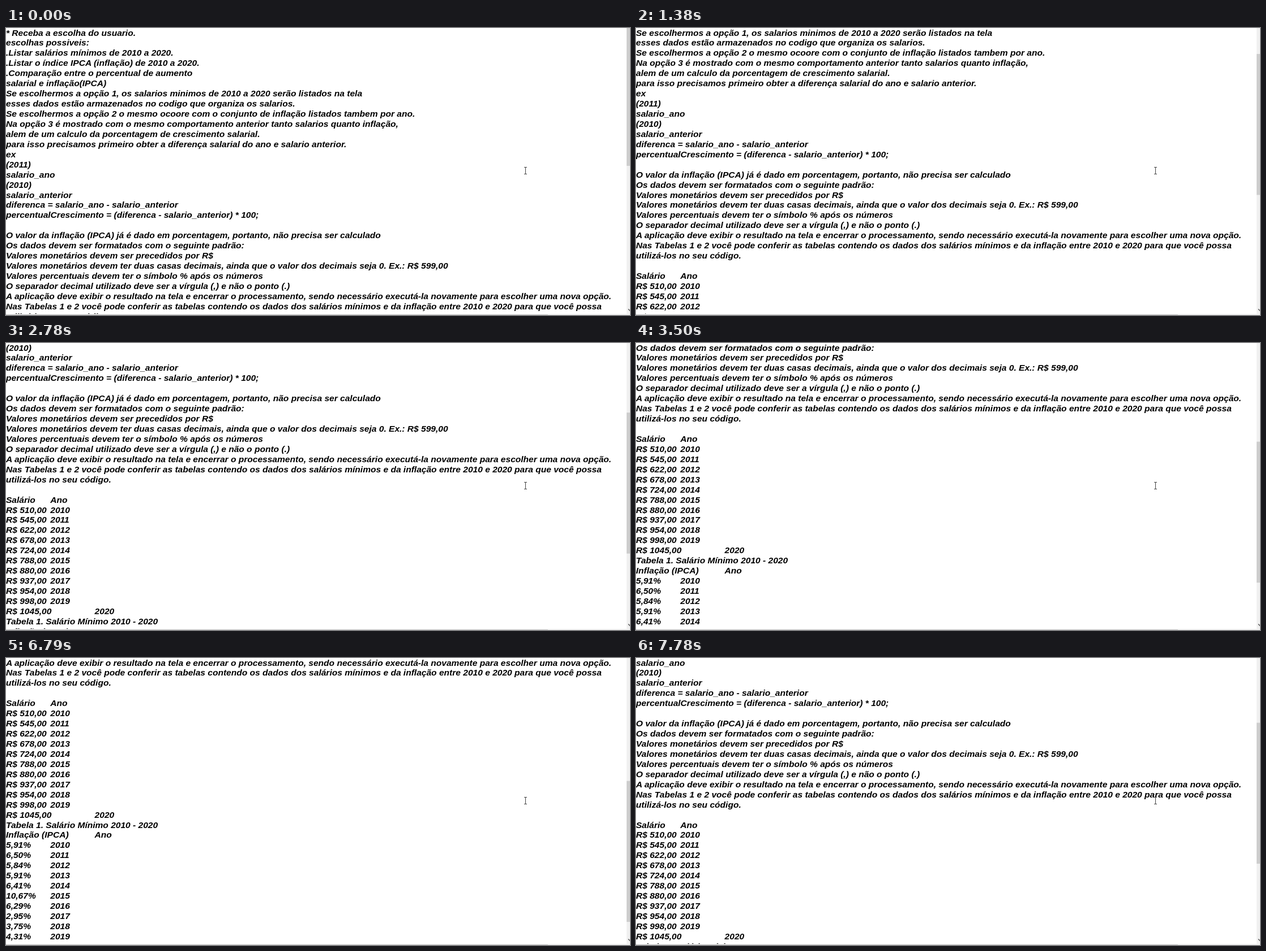
These frames come from a looping animation (1102x508 px, 8000 ms). An HTML page:

```html
<!DOCTYPE html>
<html lang="pt">
<head>
<meta charset="utf-8">
<style>
html, body { margin: 0; width: 100%; height: 100%; overflow: hidden; background: #fff; }
#stage { position: relative; width: 1102px; height: 508px; overflow: hidden; }
#view { position: absolute; left: 0; top: 0; width: 1096px; height: 506px; overflow: hidden; }
#text {
  position: absolute; left: 0; top: -0.5px; margin: 0; color: #000;
  font: italic bold 15.55px/17.93px "Liberation Sans", Arial, sans-serif;
  white-space: pre; tab-size: 78.3px;
}
svg { position: absolute; left: 0; top: 0; }
</style>
</head>
<body>
<div id="stage">
  <div id="view"><pre id="text"></pre></div>
  <svg width="1102" height="508">
    <rect x="1096" width="6" height="508" fill="#f0f0f0"/>
    <rect id="thumb" x="1096" width="6" height="249.5" fill="#cdcdcd"/>
    <rect y="506" width="1102" height="2" fill="#f0f0f0"/>
    <rect y="507" width="957" height="1" fill="#c8c8c8"/>
    <path d="M1099 497.5l4 4" stroke="#505050" stroke-width="1.5"/>
    <path d="M915 246.5h5M917.5 247v11M915 258.5h5" fill="none" stroke="#444"/>
  </svg>
</div>
<script>
const wages = ["510,00", "545,00", "622,00", "678,00", "724,00", "788,00",
  "880,00", "937,00", "954,00", "998,00", "1045,00"];
const rates = ["5,91", "6,50", "5,84", "5,91", "6,41", "10,67",
  "6,29", "2,95", "3,75", "4,31", "4,52"];
const rows = (list, format) => list.map((v, i) => format(v) + "\t" + (2010 + i)).join("\n");

const lines = `* Receba a escolha do usuario.
escolhas possiveis:
.Listar salários mínimos de 2010 a 2020.
.Listar o índice IPCA (inflação) de 2010 a 2020.
.Comparação entre o percentual de aumento
salarial e inflação(IPCA)
Se escolhermos a opção 1, os salarios minimos de 2010 a 2020 serão listados na tela
esses dados estão armazenados no codigo que organiza os salarios.
Se escolhermos a opção 2 o mesmo ocoore com o conjunto de inflação listados tambem por ano.
Na opção 3 é mostrado com o mesmo comportamento anterior tanto salarios quanto inflação,
alem de um calculo da porcentagem de crescimento salarial.
para isso precisamos primeiro obter a diferença salarial do ano e salario anterior.
ex
(2011)
salario_ano
(2010)
salario_anterior
diferenca = salario_ano - salario_anterior
percentualCrescimento = (diferenca - salario_anterior) * 100;

O valor da inflação (IPCA) já é dado em porcentagem, portanto, não precisa ser calculado
Os dados devem ser formatados com o seguinte padrão:
Valores monetários devem ser precedidos por R$
Valores monetários devem ter duas casas decimais, ainda que o valor dos decimais seja 0. Ex.: R$ 599,00
Valores percentuais devem ter o símbolo % após os números
O separador decimal utilizado deve ser a vírgula (,) e não o ponto (.)
A aplicação deve exibir o resultado na tela e encerrar o processamento, sendo necessário executá-la novamente para escolher uma nova opção.
Nas Tabelas 1 e 2 você pode conferir as tabelas contendo os dados dos salários mínimos e da inflação entre 2010 e 2020 para que você possa
utilizá-los no seu código.

Salário\tAno
${rows(wages, v => "R$ " + v)}
Tabela 1. Salário Mínimo 2010 - 2020
Inflação (IPCA)\tAno
${rows(rates, v => v + "%")}
Tabela 2. Inflação (IPCA) 2010 - 2020`.split("\n");

// Wheel clicks: three lines each, down then back up
const downs = [1240, 1380, 2050, 2250, 2780, 3040, 3500, 3720, 4040, 4180];
const ups = [6790, 6930, 7190, 7580, 7780];
const LAST = 29;
const text = document.getElementById("text");
const thumb = document.getElementById("thumb");
let shown = -1;

function draw() {
  const t = performance.now() % 8000;
  const clicks = times => times.filter(at => at <= t).length;
  const first = Math.min(LAST, 3 * clicks(downs)) - 3 * clicks(ups);
  if (first !== shown) {
    shown = first;
    text.textContent = lines.slice(first).join("\n");
    thumb.setAttribute("y", 8.58 * first - 5.5);
  }
  requestAnimationFrame(draw);
}
draw();
</script>
</body>
</html>
```
